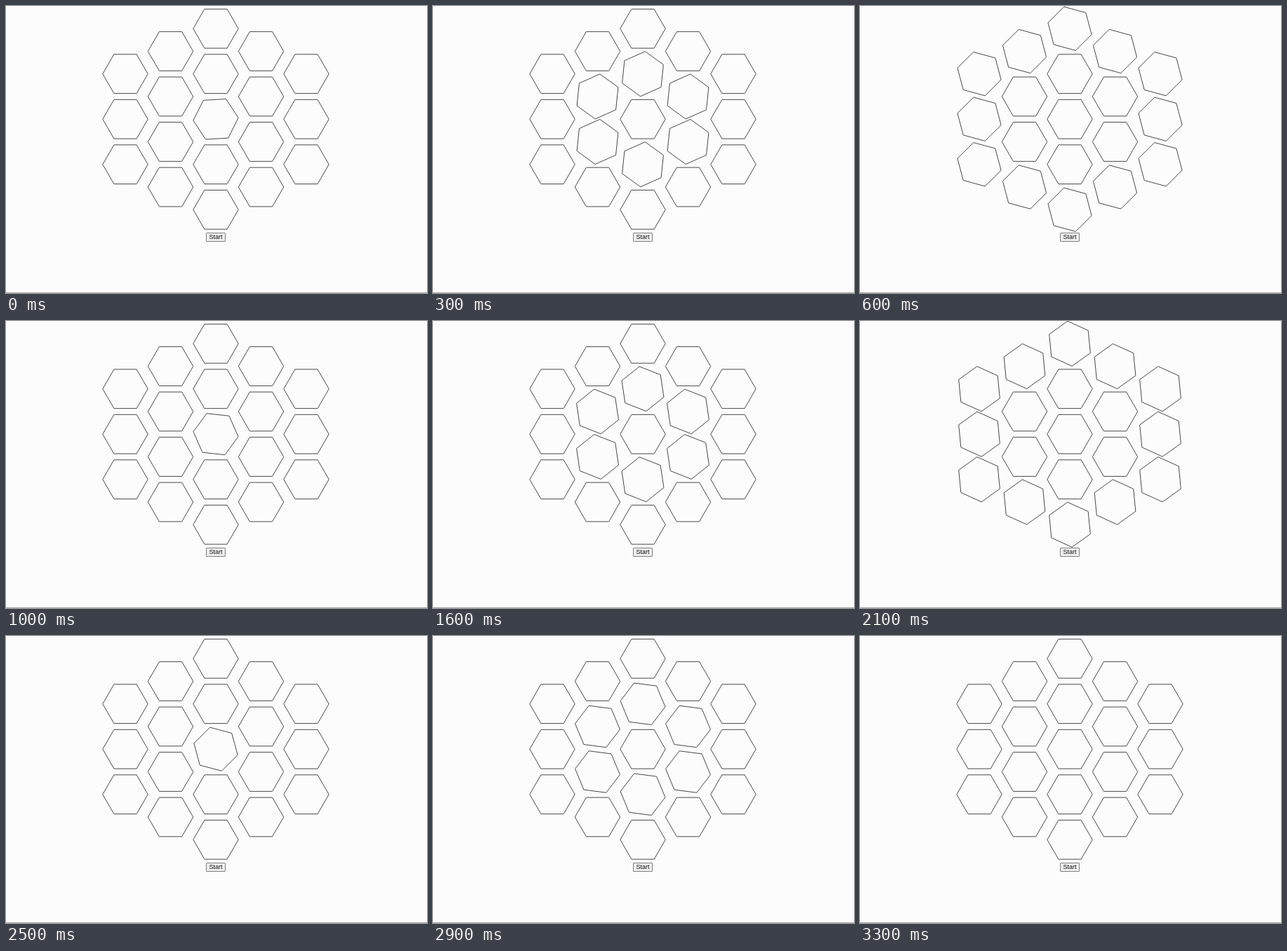
An HTML page with a canvas that plays this animation: 600 by 409 pixels, repeating every 3.4 s.

```html
<!DOCTYPE html>
<html lang="en">
<head>
<meta charset="utf-8">
<title>Hexagon rings</title>
<style>
  html, body { margin: 0; width: 600px; height: 409px; overflow: hidden; background: #fcfcfc; }
  canvas { display: block; }
  .start {
    position: absolute; left: 285px; top: 323px; width: 28px; height: 13px;
    box-sizing: border-box; border: 1px solid #808080; border-radius: 1px;
    background: #efefef; color: #111; text-align: center;
    font: 9px/11px "Liberation Sans", Arial, sans-serif;
  }
</style>
</head>
<body>
<canvas id="stage" width="600" height="409"></canvas>
<div class="start">Start</div>
<script>
const ctx = document.getElementById('stage').getContext('2d');
const LOOP = 3400, STEP = 100;
const CX = 299, CY = 161.25, GAP = 64.5, R = 32.2;

// [time, turn]: each whole turn moves one ring by 60 degrees, from the middle outwards.
const pace = [[0, 0.945], [600, 2.253], [1000, 3.104], [1600, 4.358],
              [2100, 5.407], [2500, 6.247], [3300, 8]];

const cells = [];
for (let q = -2; q <= 2; q++) {
  for (let r = -2; r <= 2; r++) {
    const ring = Math.max(Math.abs(q), Math.abs(r), Math.abs(q + r));
    if (ring <= 2) cells.push({ x: CX + q * GAP, y: CY + (r + q / 2) * GAP, ring });
  }
}

function turnAt(t) {
  let i = 1;
  while (i < pace.length - 1 && t > pace[i][0]) i++;
  const [t0, a] = pace[i - 1], [t1, b] = pace[i];
  return a + (b - a) * (t - t0) / (t1 - t0);
}

function hexagon(x, y, angle) {
  ctx.beginPath();
  for (let i = 0; i < 6; i++) {
    const a = angle + i * Math.PI / 3;
    ctx.lineTo(x + R * Math.cos(a), y + R * Math.sin(a));
  }
  ctx.closePath();
  ctx.stroke();
}

function draw(t) {
  const turn = turnAt(t);
  const active = Math.floor(turn) % 3;
  const angle = (turn % 1) * Math.PI / 3;
  ctx.fillStyle = '#fcfcfc';
  ctx.fillRect(0, 0, 600, 409);
  ctx.fillStyle = '#a8a8a8';
  ctx.fillRect(0, 408, 600, 1);
  ctx.strokeStyle = '#484848';
  ctx.lineWidth = 1;
  for (const c of cells) hexagon(c.x, c.y, c.ring === active ? angle : 0);
}

const begin = performance.now();
function tick() {
  const t = (performance.now() - begin) % LOOP;
  draw(Math.floor(t / STEP) * STEP);
  requestAnimationFrame(tick);
}
tick();
</script>
</body>
</html>
```
